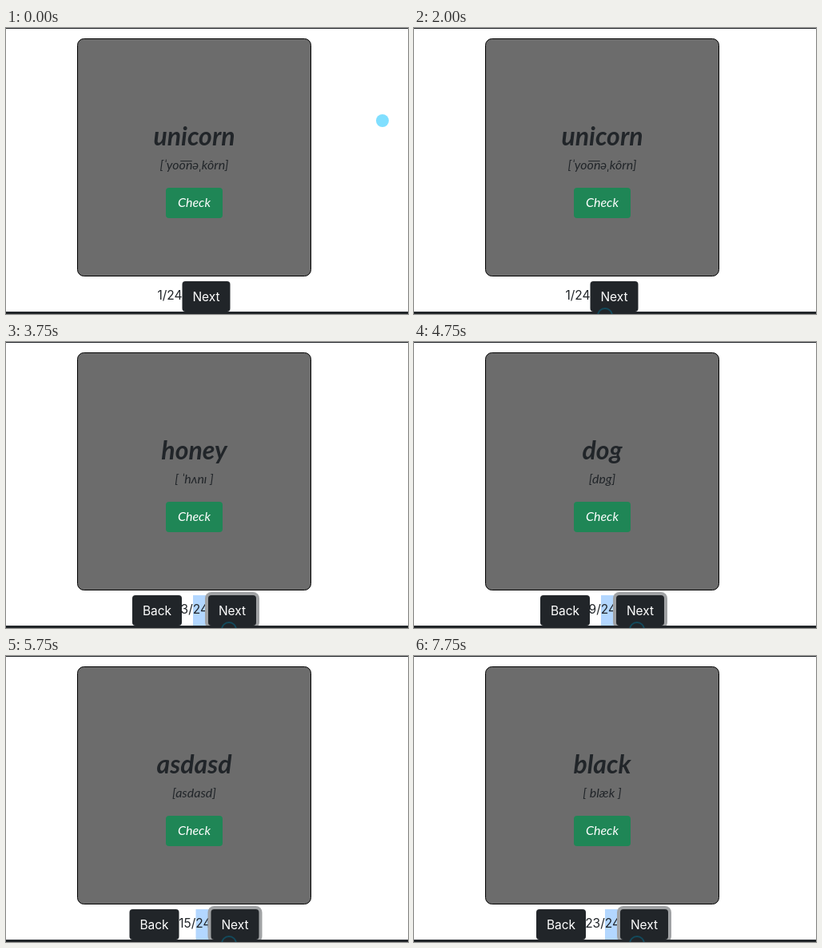
Recreate the animation shown at these times as an HTML page. Size 503 by 358 pixels, loop 8000 ms.

```html
<!DOCTYPE html>
<html lang="en">
<head>
<meta charset="utf-8">
<title>Flashcards</title>
<style>
  html, body { margin: 0; width: 100%; height: 100%; overflow: hidden; background: #fff; }
  svg { display: block; width: 503px; height: 358px; }
  text { fill: #212529; text-anchor: middle; white-space: pre; }
  .card { font-family: Lato, "Noto Sans", sans-serif; font-style: italic; font-size: 16px; }
  .bar { font-family: Inter, Roboto, sans-serif; font-size: 15.5px; }
  .word { font-size: 32px; font-weight: 700; }
  .light { fill: #fff; }
  .dark { fill: #212529; }
  #count { text-anchor: end; }
  #dot { fill: #80dfff; }
  #click { fill: none; stroke: #134a5c; stroke-width: 2; }
</style>
</head>
<body>
<svg viewBox="0 0 503 358">
  <g class="card">
    <rect x="89.5" y="13.5" width="292" height="297" rx="8" fill="#6c6c6c" stroke="#000"/>
    <text id="word" class="word" x="235.5" y="147"></text>
    <text id="sound" x="235.5" y="177"></text>
    <rect x="200" y="200" width="71" height="38" rx="4" fill="#1f8656"/>
    <text class="light" x="235.5" y="224">Check</text>
  </g>
  <g class="bar">
    <rect id="mark" y="317" width="19" height="38" fill="#b3d7ff"/>
    <text id="count" y="340"></text>
    <g id="back">
      <rect class="dark" y="317" width="62" height="38" rx="4"/>
      <text class="light" x="31" y="342">Back</text>
    </g>
    <g id="next">
      <rect id="focus" x="-4" y="313" width="68" height="46" rx="8" fill="#a0a2a4"/>
      <rect class="dark" y="317" width="60" height="38" rx="4"/>
      <text class="light" x="30" y="342">Next</text>
    </g>
  </g>
  <rect class="dark" width="503" height="1"/>
  <rect class="dark" y="355" width="503" height="3"/>
  <circle id="dot" r="8"/>
  <circle id="click" r="9"/>
</svg>
<script>
  const LOOP = 8000, STEP = 250, CENTER = 235.5;
  const words = [
    ['unicorn', '[ˈyo͞onəˌkôrn]'],
    ['honey', '[ ˈhʌnɪ ]'],
    ['dog', '[dɒg]'],
    ['asdasd', '[asdasd]'],
    ['cat', '[ kot ]'],
    ['black', '[ blæk ]']
  ];
  const deck = '041254312354123523143250';
  // Card number on each step from 3500 ms on
  const cards = [3, 3, 5, 6, 8, 9, 11, 12, 14, 15, 16, 18, 19, 20, 21, 22, 22, 23];
  // Pointer moves: [step, x, y]
  const moves = [
    [0, 471, 116], [1, 430, 170], [2, 320, 270], [3, 217, 345],
    [4, 239, 360], [11, 260, 356], [12, 279, 360]
  ];

  const el = id => document.getElementById(id);
  const show = (id, on) => el(id).setAttribute('visibility', on ? 'visible' : 'hidden');
  const shift = (id, x, y = 0) => el(id).setAttribute('transform', `translate(${x} ${y})`);

  function cardAt(step) {
    if (step < 9) return 1;
    return step < 14 ? 2 : cards[step - 14];
  }

  // Digits are 10 wide, except the narrower 1
  const countWidth = n => 23 + [...String(n)].reduce((w, d) => w + (d === '1' ? 7 : 10), 0);

  function draw(step) {
    const n = cardAt(step);
    const [word, sound] = words[deck[n - 1]];
    el('word').textContent = word;
    el('sound').textContent = sound;
    el('count').textContent = `${n}/24`;

    const backWidth = n > 1 ? 62 : 0;
    const width = countWidth(n);
    const left = CENTER - (backWidth + width + 60) / 2;
    const nextX = left + backWidth + width;
    shift('back', left);
    shift('next', nextX);
    el('count').setAttribute('x', nextX);
    el('mark').setAttribute('x', nextX - 19);
    show('back', n > 1);
    show('mark', step >= 10);
    show('focus', step === 9 || step >= 13);

    const [, x, y] = moves.filter(m => m[0] <= step).pop();
    const pressed = (step >= 8 && step <= 10) || step >= 13;
    shift('dot', x, y);
    shift('click', x, y);
    show('dot', !pressed);
    show('click', pressed);
  }

  let last = -1;
  const start = performance.now();
  function tick() {
    const step = Math.floor(((performance.now() - start) % LOOP) / STEP);
    if (step !== last) draw(last = step);
    requestAnimationFrame(tick);
  }
  tick();
</script>
</body>
</html>
```
